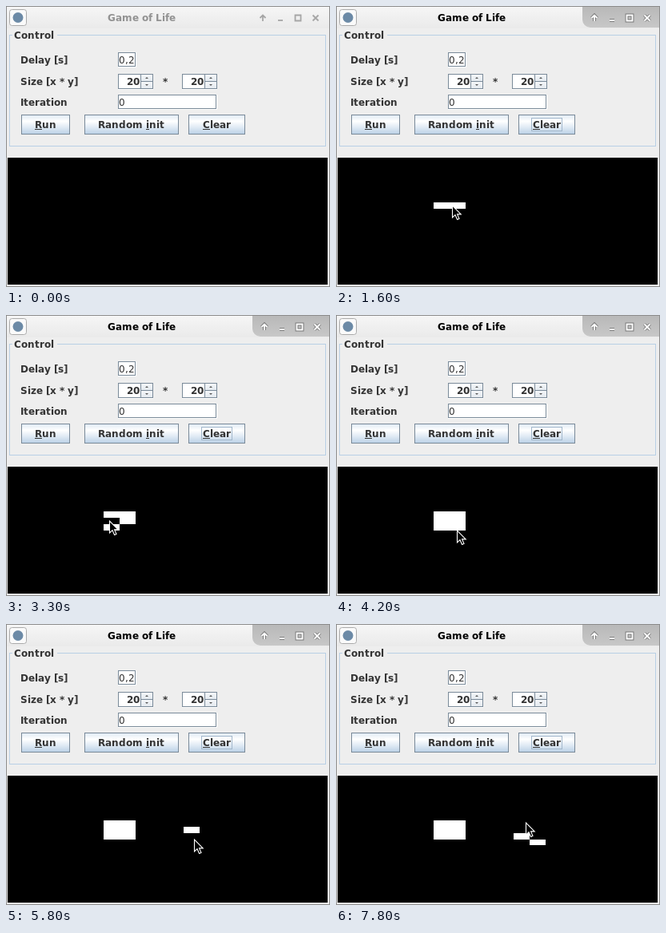
These frames come from a looping animation (405 by 352 pixels, 8 s). An HTML page with a canvas:

```html
<!DOCTYPE html>
<html lang="en">
<head>
<meta charset="utf-8">
<title>Game of Life</title>
<style>
  html, body { margin: 0; width: 100%; height: 100%; overflow: hidden; background: #eee; }
  canvas { display: block; }
</style>
</head>
<body>
<canvas id="stage" width="405" height="352"></canvas>
<script>
const ctx = document.getElementById('stage').getContext('2d');
const LOOP = 8000, STEP = 100, ACTIVATED = 1000;
const BORDER = '#7a8a99', INK = '#333';
const BOARD = { x: 2, y: 190, w: 400, h: 159, count: 20 };
const CELL_W = BOARD.w / BOARD.count, CELL_H = BOARD.h / BOARD.count;

// Pointer stops: arrival, rest in ms, x, y. A rest ends with a click.
const stops = [
  [400, 0, 225, 118], [700, 300, 139, 249], [1200, 400, 145, 249],
  [2200, 200, 134, 262], [2800, 200, 154, 259], [3300, 300, 129, 257],
  [3800, 200, 146, 265], [4200, 0, 151, 269], [4800, 300, 235, 254],
  [5400, 100, 235, 266], [5700, 100, 235, 269], [6100, 200, 242, 270],
  [6800, 200, 237, 267], [7300, 200, 238, 254], [7800, 200, 237, 248]
].map(([arrive, rest, x, y]) => ({ arrive, leave: arrive + rest, x, y }));

function rect(x, y, w, h, fill) {
  ctx.fillStyle = fill;
  ctx.fillRect(x, y, w, h);
}

function frame(x, y, w, h, color) {
  ctx.strokeStyle = color;
  ctx.lineWidth = 1;
  ctx.strokeRect(x + .5, y + .5, w - 1, h - 1);
}

function vertical(y, h, ...colors) {
  const g = ctx.createLinearGradient(0, y, 0, y + h);
  colors.forEach((color, i) => g.addColorStop(i / (colors.length - 1), color));
  return g;
}

function setFont(weight = 'bold') {
  ctx.font = `${weight} 12px "DejaVu Sans", sans-serif`;
}

// Letters advance by whole pixels.
const advance = char => Math.round(ctx.measureText(char).width);
const textWidth = str => [...str].reduce((sum, char) => sum + advance(char), 0);

function text(str, x, y, { weight, color = INK, underline = -1 } = {}) {
  setFont(weight);
  ctx.fillStyle = color;
  [...str].forEach((char, i) => {
    ctx.fillText(char, x, y);
    if (i === underline) ctx.fillRect(x, y + 1, advance(char), 1);
    x += advance(char);
  });
}

function sunken(x, y, w, h) {
  rect(x, y, w, h, '#fff');
  frame(x, y, w - 1, h - 1, BORDER);
}

function field(x, y, w, h, value) {
  sunken(x, y, w, h);
  text(value, x + 1, y + 14, { weight: 'normal' });
}

function arrow(x, y, dir) {
  ctx.fillStyle = '#555';
  ctx.beginPath();
  ctx.moveTo(x - 2, y + dir);
  ctx.lineTo(x + 2, y + dir);
  ctx.lineTo(x, y - dir);
  ctx.fill();
}

function spinner(x) {
  sunken(x, 85, 44, 20);
  for (const [y, dir] of [[85, 1], [94, -1]]) {
    rect(x + 28, y, 16, 10, vertical(y, 10, '#f6f8fa', '#e2e8ee'));
    frame(x + 28, y, 16, 10, BORDER);
    arrow(x + 36, y + 5, dir);
  }
  text('20', x + 11, 99);
}

function button(x, w, label, underline, focused) {
  setFont();
  const width = textWidth(label), textX = Math.floor(x + (w - width) / 2);
  rect(x, 136, w, 25, vertical(136, 25, '#dde8f3', '#fff', '#dde8f3', '#b8cfe5'));
  frame(x, 136, w, 25, BORDER);
  text(label, textX, 153, { underline });
  if (focused) frame(textX - 2, 140, width + 4, 17, '#a3b8cc');
}

function line(...points) {
  points.forEach(([x, y], i) => i ? ctx.lineTo(x, y) : ctx.moveTo(x, y));
}

const windowGlyphs = [
  () => { line([0, 4], [0, -3]); line([-3.5, 0], [0, -3.5], [3.5, 0]); },
  () => line([-3, 3], [3, 3]),
  () => ctx.rect(-3.5, -3.5, 7, 7),
  () => { line([-3.5, -3.5], [3.5, 3.5]); line([3.5, -3.5], [-3.5, 3.5]); }
];

function strokeGlyphs(x, color, width) {
  ctx.strokeStyle = color;
  ctx.lineWidth = width;
  windowGlyphs.forEach((trace, i) => {
    ctx.save();
    ctx.translate(x + i * 22, 15);
    ctx.beginPath();
    trace();
    ctx.stroke();
    ctx.restore();
  });
}

function icon() {
  ctx.fillStyle = '#fafafa';
  ctx.strokeStyle = '#aaa';
  ctx.lineWidth = 1;
  ctx.beginPath();
  ctx.roundRect(4.5, 4.5, 21, 20, 3);
  ctx.fill();
  ctx.stroke();
  ctx.fillStyle = '#6c8aa6';
  ctx.beginPath();
  ctx.arc(15, 14.5, 6.5, 0, 7);
  ctx.fill();
}

function titleBar(active) {
  rect(0, 0, 405, 28, vertical(0, 28, '#f6f6f6', '#eaeaea'));
  icon();
  text('Game of Life', 127, 19, { color: active ? '#000' : '#929292' });
  if (!active) return strokeGlyphs(321, '#a6a6a6', 1.8);
  ctx.fillStyle = vertical(0, 28, '#b8b8b8', '#c8c8c8');
  ctx.beginPath();
  ctx.roundRect(308, 1, 96, 26, [0, 0, 0, 10]);
  ctx.fill();
  strokeGlyphs(323, '#777', 3.8);
  strokeGlyphs(323, '#fff', 1.9);
}

function controls(active) {
  frame(4, 36, 396, 140, '#b8cfe5');
  rect(8, 34, 56, 5, '#eee');
  text('Control', 10, 41);
  text('Delay [s]', 18, 72);
  text('Size [x * y]', 18, 99);
  text('Iteration', 18, 125);
  text('*', 196, 99);
  field(140, 58, 23, 19, '0,2');
  spinner(140);
  spinner(220);
  field(140, 111, 124, 19, '0');
  button(19, 61, 'Run', 0);
  button(98, 118, 'Random init', 7);
  button(228, 71, 'Clear', 0, active);
}

// Every click flips the cell under the pointer.
function board(t) {
  rect(BOARD.x, BOARD.y, BOARD.w, BOARD.h, '#000');
  const alive = new Map();
  for (const { arrive, leave, x, y } of stops) {
    if (leave === arrive || t < leave) continue;
    const col = Math.floor((x - BOARD.x) / CELL_W);
    const row = Math.floor((y - BOARD.y) / CELL_H);
    const key = `${col},${row}`;
    if (!alive.delete(key)) alive.set(key, [col, row]);
  }
  const rowTop = row => Math.round(BOARD.y + row * CELL_H);
  for (const [col, row] of alive.values())
    rect(BOARD.x + col * CELL_W, rowTop(row), CELL_W, rowTop(row + 1) - rowTop(row), '#fff');
}

function pointerAt(t) {
  const i = stops.findLastIndex(stop => stop.arrive <= t);
  const from = stops[i], to = stops[i + 1] || from;
  if (t <= from.leave) return [from.x, from.y];
  const k = (t - from.leave) / (to.arrive - from.leave);
  return [from.x + (to.x - from.x) * k, from.y + (to.y - from.y) * k].map(Math.round);
}

function pointer(t) {
  if (t < stops[0].arrive) return;
  ctx.save();
  ctx.translate(...pointerAt(t));
  ctx.beginPath();
  line([.5, 1], [.5, 16], [4, 12.7], [6.6, 18.5], [9, 17.5], [6.6, 11.9], [11.2, 11.9]);
  ctx.closePath();
  ctx.fillStyle = '#000';
  ctx.strokeStyle = '#fff';
  ctx.lineWidth = 1.1;
  ctx.fill();
  ctx.stroke();
  ctx.restore();
}

function draw(now) {
  const t = Math.floor(now % LOOP / STEP) * STEP;
  const active = t >= ACTIVATED;
  rect(0, 0, 405, 352, '#eee');
  titleBar(active);
  controls(active);
  board(t);
  frame(0, 0, 405, 352, '#8c8c8c');
  pointer(t);
}

const start = performance.now();
function tick() {
  draw(performance.now() - start);
  requestAnimationFrame(tick);
}
tick();
</script>
</body>
</html>
```
